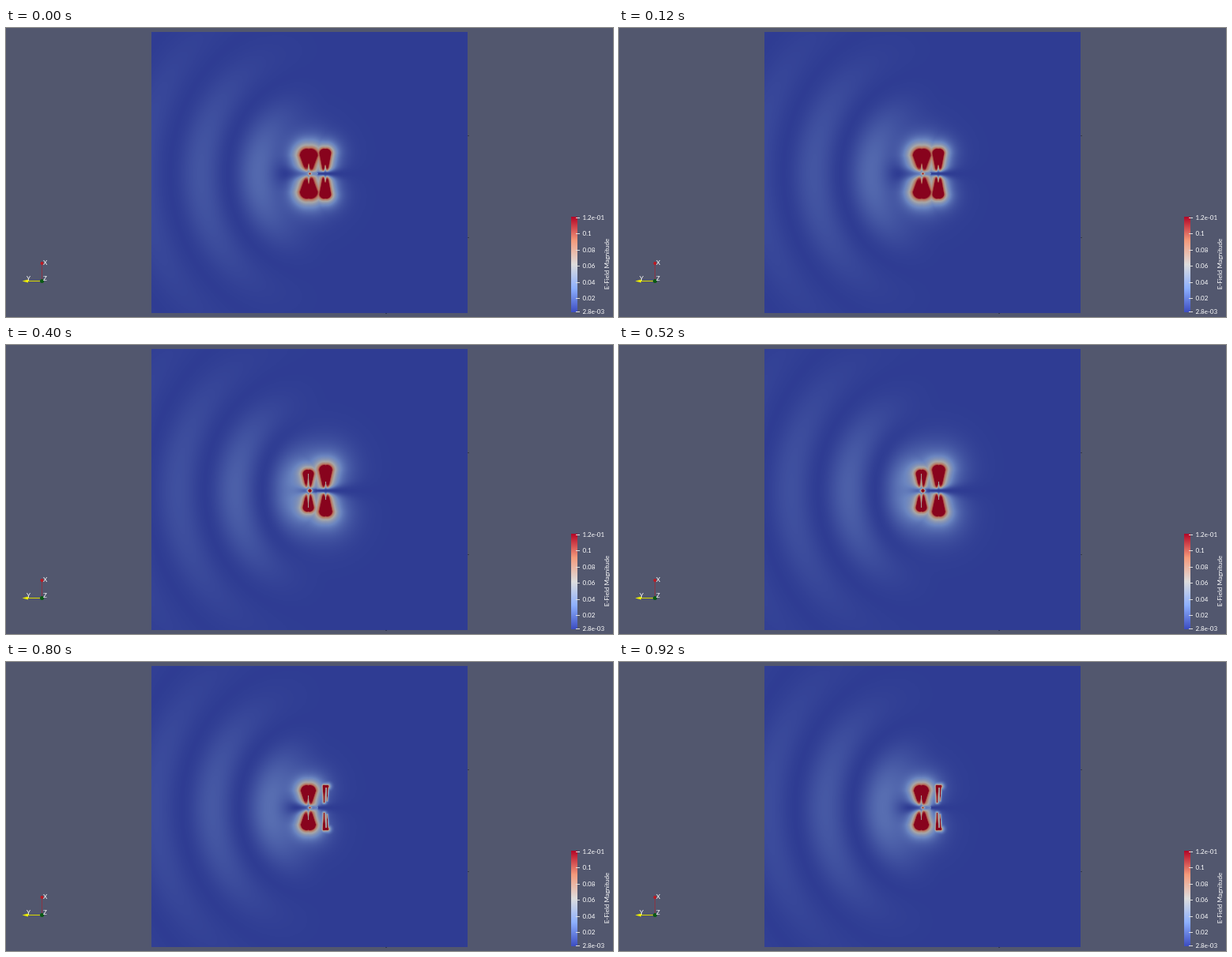
Write an HTML page with a canvas that moves like this. It is 768 px wide and 366 px high and loops after 1000 ms.

```html
<!DOCTYPE html>
<html lang="en">
<head>
<meta charset="utf-8">
<title>Antenna field</title>
<style>
  html, body { margin: 0; width: 100%; height: 100%; overflow: hidden; background: rgb(82,87,110); }
  canvas { display: block; }
</style>
</head>
<body>
<canvas id="view" width="768" height="366"></canvas>
<script>
const ctx = document.getElementById('view').getContext('2d');
const LEFT = 184, TOP = 5, W = 400, H = 356;
const AXIS = 184, SOURCE = 395;
const STEP = 200, STEPS = 5;
const SPACING = 72.5, FLOOR = 0.01;

const STOPS = [[59, 76, 192], [141, 176, 254], [221, 221, 221], [244, 154, 123], [180, 4, 38]];

function coolWarm(t, shade = 1) {
  const p = Math.min(1, Math.max(0, t)) * 4;
  const i = Math.min(3, Math.floor(p));
  return STOPS[i].map((c, k) => (c + (STOPS[i + 1][k] - c) * (p - i)) * shade);
}

const PALETTE = Array.from({ length: 512 }, (_, i) => coolWarm(i / 511, 0.755));

// Tapered bar; s is the distance from the horizontal axis.
const bar = (xa, sa, ra, xb, sb, rb, glow) => ({ xa, sa, ra, xb, sb, rb, glow });

// Two prongs that merge into one rounded lobe, with a pale slit at the root.
function lobe(x, half, top, glow, slit = 15) {
  const r = half * 0.76, off = half - r;
  return [-1, 1].map(k => ({
    ...bar(x + k * off, 4, 1.2, x + k * off, top - r, r, glow), x, slit
  }));
}

// phase by phase: left element, right element, feed point radius, wide haze [x, s, radius, strength]
const POSES = [
  { a: lobe(383, 10.6, 31, 7), b: lobe(404, 6.8, 31, 5.5, 13), feed: 0.6, haze: [383, 28, 32, 0.05] },
  { a: lobe(383, 10.6, 31, 7.5), b: lobe(404.5, 8.3, 32, 7, 12), feed: 1.9, haze: [388, 30, 42, 0.12] },
  { a: lobe(382.5, 6.5, 26, 4.5, 22), b: lobe(404.5, 7.8, 32, 6, 12), feed: 1.8, haze: [405, 30, 36, 0.11] },
  {
    a: [bar(379, 23.5, 1.2, 385, 23.5, 1.2, 2.2), bar(379, 23.5, 1.1, 379.5, 7, 0.1, 1.7),
        bar(385, 23.5, 1.1, 385, 1, 0.9, 1.7)],
    b: lobe(404.5, 4.7, 31, 4, 14), feed: 1.4, haze: [418, 30, 30, 0.07]
  },
  {
    a: lobe(382.5, 9, 28, 6, 16),
    b: [bar(402.5, 27, 1, 407, 27, 1, 2), bar(402.5, 27, 1.4, 402.5, 7, 0.1, 1.7),
        bar(407, 27, 0.5, 406, 9, 0, 1)],
    feed: 0.5, haze: [385, 30, 30, 0.04]
  }
];

function barValue(b, x, s) {
  const ux = b.xb - b.xa, us = b.sb - b.sa;
  const h = Math.min(1, Math.max(0, ((x - b.xa) * ux + (s - b.sa) * us) / (ux * ux + us * us)));
  const d = Math.hypot(x - b.xa - ux * h, s - b.sa - us * h) - (b.ra + (b.rb - b.ra) * h);
  let v = Math.exp(-Math.pow(Math.max(0, d) / b.glow, 0.85));
  if (b.slit && s < b.slit) {
    const w = 1.9 * (1 - s / b.slit) + 0.1;
    v *= 1 - 0.55 * Math.exp(-(((x - b.x) / w) ** 2));
  }
  return v;
}

const strongest = (bars, x, s) => bars.reduce((m, b) => Math.max(m, barValue(b, x, s)), 0);

function wave(x, s, phase) {
  const dx = SOURCE - x, r = Math.hypot(dx, s) + 0.01;
  const path = r - 14 * (s / r) ** 2;
  const beam = Math.pow(Math.max(0, (dx / r + 0.15) / 1.15), 1 + r / 120);
  const crest = Math.pow(Math.cos(Math.PI * ((path - 35) / SPACING - phase)) ** 2, 0.85);
  return 0.27 * Math.exp(-r / 125) * beam * crest;
}

function fieldAt(x, s, pose, phase) {
  let near = 0;
  if (Math.abs(x - SOURCE) < 120 && s < 130) {
    const a = strongest(pose.a, x, s), b = strongest(pose.b, x, s);
    const [hx, hs, hr, strength] = pose.haze;
    const haze = strength * Math.exp(-((x - hx) ** 2 + (s - hs) ** 2) / hr ** 2);
    const gap = 2.6 + 0.14 * Math.abs(x - SOURCE);
    const glow = Math.max(a, b) + 0.1 * Math.min(a, b);
    near = (glow + haze * (1 - glow)) * (1 - Math.exp(-((s / gap) ** 2)));
    const feed = Math.max(0, Math.hypot(x - 384.5, s) - pose.feed);
    near = Math.max(near, Math.exp(-feed / 1.2));
  }
  return FLOOR + near + wave(x, s, phase) * Math.max(0, 1 - near);
}

function renderField(step) {
  const img = ctx.createImageData(W, H);
  const phase = ((step + 3) % STEPS) / STEPS;
  for (let j = 0, o = 0; j < H; j++) {
    const s = Math.abs(j + TOP - AXIS);
    for (let i = 0; i < W; i++, o += 4) {
      const v = fieldAt(i + LEFT + 0.5, s, POSES[step], phase);
      const c = PALETTE[Math.min(511, Math.round(v * 511))];
      img.data[o] = c[0];
      img.data[o + 1] = c[1];
      img.data[o + 2] = c[2];
      img.data[o + 3] = 255;
    }
  }
  return img;
}

function rect(color, x, y, w, h) {
  ctx.fillStyle = color;
  ctx.fillRect(x, y, w, h);
}

function dot(color, x, y, r) {
  ctx.fillStyle = color;
  ctx.beginPath();
  ctx.arc(x, y, r, 0, 7);
  ctx.fill();
}

function label(text, x, y, size = 8) {
  ctx.font = size + 'px Lato, "Open Sans", sans-serif';
  ctx.fillStyle = '#fff';
  ctx.fillText(text, x, y);
}

function drawLegend() {
  const y0 = 239, y1 = 360;
  const ramp = ctx.createLinearGradient(0, y1, 0, y0);
  for (let i = 0; i <= 16; i++) ramp.addColorStop(i / 16, `rgb(${coolWarm(i / 16).join()})`);
  rect(ramp, 715, y0, 8, y1 - y0);
  const marks = ['1.2e-01', '0.1', '0.08', '0.06', '0.04', '0.02', '2.8e-03'];
  ctx.textBaseline = 'middle';
  marks.forEach((text, i) => {
    const y = i < 6 ? Math.round(239.5 + i * 20.5) : 359;
    rect('#ddd', 721, y, 5, 1);
    label(text, 729.5, y + 0.5);
  });
  ctx.save();
  ctx.translate(761, 299);
  ctx.rotate(-Math.PI / 2);
  ctx.textAlign = 'center';
  label('E-Field Magnitude', 0, 0);
  ctx.restore();
}

function drawAxes() {
  rect('#8a3444', 45, 298, 1, 22);
  rect('#d8d800', 26, 320, 18, 1);
  ctx.fillStyle = '#eded00';
  ctx.beginPath();
  ctx.moveTo(20.5, 320.5);
  ctx.lineTo(28, 318.5);
  ctx.lineTo(28, 322.5);
  ctx.fill();
  dot('#c01820', 45.5, 298, 2);
  dot('#0a5a14', 45.5, 320.5, 2.5);
  label('X', 47, 297.5);
  label('Y', 26, 318);
  label('Z', 47, 318);
}

function drawStill() {
  rect('rgb(82,87,110)', 0, 0, 768, 366);
  drawLegend();
  drawAxes();
  [[584, 136], [584, 265], [480, 361]].forEach(([x, y]) => rect('#34384c', x, y, 2, 1));
}

const fields = POSES.map((_, i) => renderField(i));
let shown = -1;

function tick() {
  const step = Math.floor(performance.now() / STEP) % STEPS;
  if (step !== shown) {
    ctx.putImageData(fields[step], LEFT, TOP);
    shown = step;
  }
  requestAnimationFrame(tick);
}

drawStill();
tick();
</script>
</body>
</html>
```
